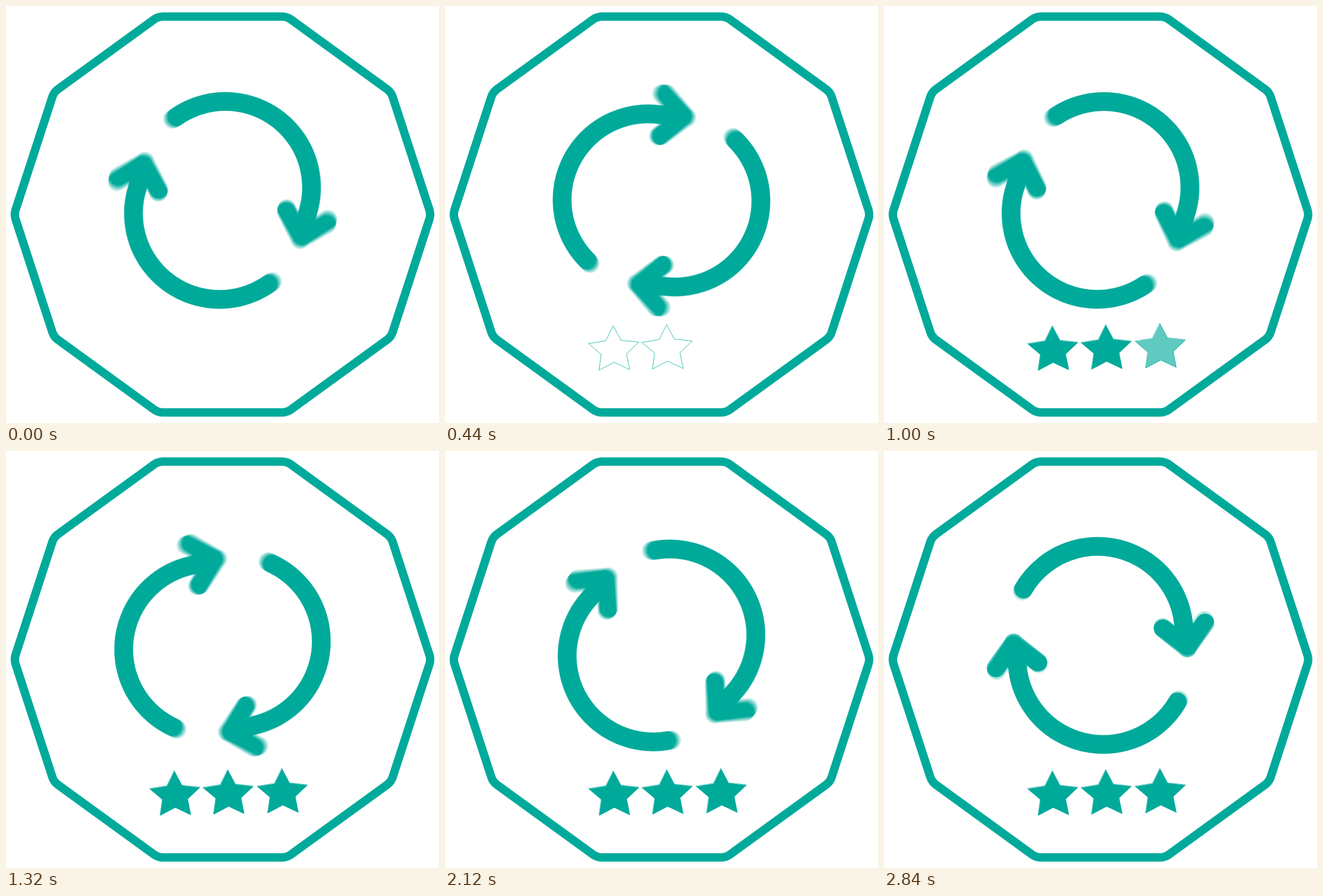
Recreate the animation shown at these times as an HTML page with a canvas. Size 762 by 735 pixels, loop 2.88 s.

```html
<!DOCTYPE html>
<html lang="en">
<head>
<meta charset="utf-8">
<title>Refresh and rate</title>
<style>
  html, body { margin: 0; width: 100%; height: 100%; overflow: hidden; background: #fff; }
  canvas { display: block; }
</style>
</head>
<body>
<canvas id="stage" width="762" height="735"></canvas>
<script>
const W = 762, H = 735, TEAL = '#00aa9b';
const LOOP = 2880, STEP = 40, LAST = LOOP / STEP - 1;
const RAD = Math.PI / 180;
const SPIN = 720 / 99;            // degrees per step
const SHUTTER = 0.5, SAMPLES = 15; // motion blur

const ctx = document.getElementById('stage').getContext('2d');
const layer = document.createElement('canvas');
layer.width = W;
layer.height = H;
const blur = layer.getContext('2d');

const clamp = v => Math.max(0, Math.min(1, v));

function decagonPath() {
  const path = new Path2D(), cx = 381, cy = 367.5, r = 366.8;
  const corner = i => [cx + r * Math.cos(36 * i * RAD), cy + r * Math.sin(36 * i * RAD)];
  const [a, b] = [corner(0), corner(1)];
  path.moveTo((a[0] + b[0]) / 2, (a[1] + b[1]) / 2);
  for (let i = 1; i <= 10; i++) path.arcTo(...corner(i), ...corner(i + 1), 27);
  path.closePath();
  return path;
}

function polygonPath(points) {
  const path = new Path2D();
  points.forEach(([x, y]) => path.lineTo(x, y));
  path.closePath();
  return path;
}

const decagon = decagonPath();
const star = polygonPath([
  [296, 563.5], [309.5, 589], [341, 592.5], [319.5, 613], [325, 641],
  [297.5, 628], [271, 642], [275, 614], [252.5, 595], [283, 590]
]);
const STAR_LENGTH = 300;
const stars = [
  { x: 0, y: 0, draw: 120, fill: 480 },
  { x: 94, y: -2, draw: 280, fill: 640 },
  { x: 189.3, y: -4.2, draw: 440, fill: 800 }
];

// One arrow, relative to the centre of rotation
const shaft = new Path2D();
shaft.arc(-4.5, -23.1, 151.5, 210.3 * RAD, 355 * RAD);
shaft.lineTo(152.8, 4.5);
const head = new Path2D('M110 -29.5 L152.8 4.5 L184 -39.5');

function drawArrows(step) {
  blur.setTransform(1, 0, 0, 1, 0, 0);
  blur.globalCompositeOperation = 'source-over';
  blur.globalAlpha = 1;
  blur.clearRect(0, 0, W, H);
  const sample = document.createElement('canvas');
  sample.width = W;
  sample.height = H;
  const pen = sample.getContext('2d');
  pen.lineCap = pen.lineJoin = 'round';
  blur.globalCompositeOperation = 'lighter';
  blur.globalAlpha = 1 / SAMPLES;
  for (let i = 0; i < SAMPLES; i++) {
    const offset = SHUTTER * (i / (SAMPLES - 1) - 0.5);
    const angle = (Math.min(step + offset, LAST) - LAST) * SPIN;
    pen.setTransform(1, 0, 0, 1, 0, 0);
    pen.clearRect(0, 0, W, H);
    pen.translate(381, 342.7);
    pen.rotate(angle * RAD);
    for (let side = 0; side < 2; side++) {
      pen.lineWidth = 33;
      pen.stroke(shaft);
      pen.lineWidth = 32.5;
      pen.stroke(head);
      pen.rotate(Math.PI);
    }
    blur.drawImage(sample, 0, 0);
  }
  blur.globalAlpha = 1;
  blur.globalCompositeOperation = 'source-in';
  blur.fillStyle = TEAL;
  blur.fillRect(0, 0, W, H);
  ctx.drawImage(layer, 0, 0);
}

function drawStar({ x, y, draw, fill }, time) {
  const outline = clamp((time - draw) / 160);
  if (!outline) return;
  ctx.save();
  ctx.translate(x, y);
  ctx.lineWidth = 0.8;
  if (outline < 1) ctx.setLineDash([STAR_LENGTH * outline, STAR_LENGTH]);
  ctx.stroke(star);
  ctx.globalAlpha = clamp((time - fill) / 320);
  ctx.translate(0.4, 0.8);
  ctx.fill(star);
  ctx.restore();
}

function render(step) {
  ctx.fillStyle = '#fff';
  ctx.fillRect(0, 0, W, H);
  ctx.fillStyle = ctx.strokeStyle = TEAL;
  ctx.lineWidth = 14.8;
  ctx.stroke(decagon);
  stars.forEach(s => drawStar(s, step * STEP));
  drawArrows(step);
}

let shown = -1;
function tick() {
  const step = Math.floor(performance.now() % LOOP / STEP);
  if (step !== shown) render(shown = step);
  requestAnimationFrame(tick);
}
tick();
</script>
</body>
</html>
```
